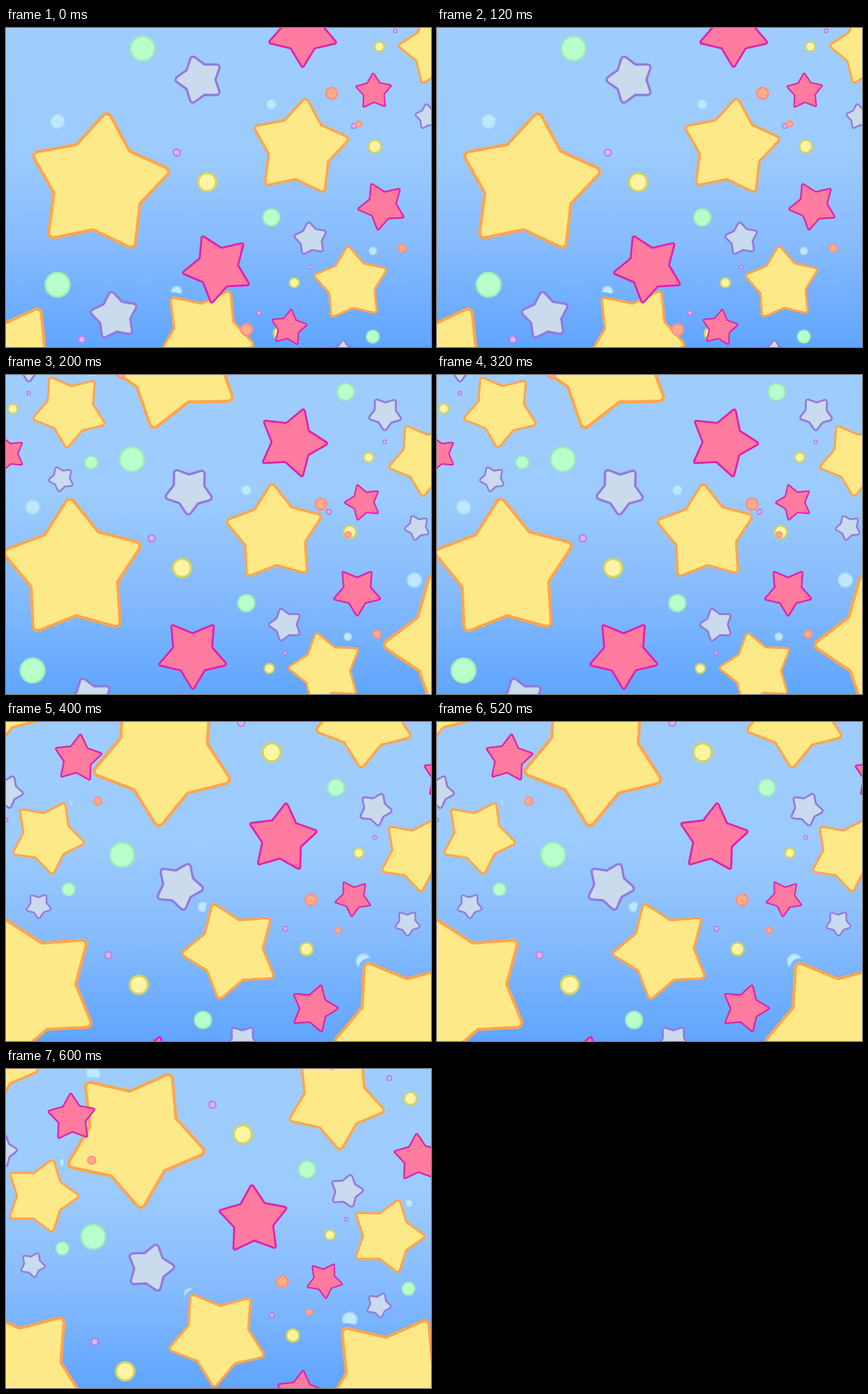
An HTML page with a canvas that plays this animation: 560x420 px, repeating every 800 ms.

```html
<!DOCTYPE html>
<html lang="en">
<head>
<meta charset="utf-8">
<title>Falling stars</title>
<style>
html, body { margin: 0; width: 100%; height: 100%; overflow: hidden; background: #9ecdfd; }
canvas { display: block; }
</style>
</head>
<body>
<canvas id="stage" width="560" height="420"></canvas>
<script>
const ctx = document.getElementById('stage').getContext('2d');
const STEP = 200, STEPS = 4;

const sky = ctx.createLinearGradient(0, 0, 0, 420);
[[0, '#9ecdfd'], [.38, '#9ccbfd'], [.68, '#86bbfd'], [1, '#60a5fe']]
  .forEach(([at, color]) => sky.addColorStop(at, color));

// The same cluster appears at three depths; the far one is mirrored.
const layers = [
  { x: 122, y: 206, size: 1, flip: 1 },
  { x: 387, y: 158, size: .692, flip: 1 },
  { x: 455, y: 337, size: .525, flip: -1 }
];

// Parts of a cluster, back to front. Stars have an inner radius and a tilt (near, far).
const parts = [
  { x: -54, y: -83, r: 9.5, fill: '#bfe8fc', line: '#a5d5f7', w: 2 },
  { x: 0, y: 0, r: 98, inner: 60, round: 6, tilt: [7, -5], halo: true, fill: '#fee988', line: '#ffa54f', w: 4 },
  { x: 143, y: -3, r: 12, fill: '#fff4a3', line: '#d0d465', w: 3 },
  { x: 21, y: 173, r: 34.5, inner: 21, round: 4, tilt: [-8, 2], fill: '#c9dbed', line: '#9478dd', w: 3 },
  { x: -54, y: 132, r: 16, fill: '#b9ffcb', line: '#9bedb8', w: 2.5 },
  { x: 103, y: -42, r: 4.5, fill: '#dfb4f0', line: '#b184e0', w: 2 },
  { x: 157, y: 110, r: 48, inner: 27, round: 2, tilt: [-26, -64], fill: '#ff7b9f', line: '#e01fae', w: 2.5 },
  { x: 195, y: 191, r: 7.5, fill: '#ffad88', line: '#ff8f8b', w: 2.5 }
];

// Clusters fall along this trail, one point per step; a new one enters every loop.
const trail = [
  [112, -311], [98, -227], [85, -163], [47, -117], [0, 0],
  [-33, 51], [-90, 143], [-108, 195], [-125, 246]
];
// Neighbours that reach in from the left and right, by step.
const sides = [
  [],
  [[-371, -291], [470, 147]],
  [[-401, -186], [403, 192]],
  [[-409, -170], [385, 207]]
];

// Stars spin in proportion to how far they have fallen.
const spin = k => -trail[k][1] / 5;

function copies(step) {
  const list = sides[step].map(at => ({ at, turn: spin(step) }));
  for (let k = step; k < trail.length; k += STEPS) list.push({ at: trail[k], turn: spin(k) });
  return list;
}

function starPath(x, y, part, size, turn) {
  const path = new Path2D();
  const point = i => {
    const a = (turn + 36 * i) * Math.PI / 180;
    const r = (i % 2 ? part.inner : part.r) * size;
    return [x + r * Math.sin(a), y - r * Math.cos(a)];
  };
  path.moveTo(...point(-1));
  for (let i = 0; i < 10; i += 2) {
    path.arcTo(...point(i), ...point(i + 1), part.round * size);
    path.lineTo(...point(i + 1));
  }
  path.closePath();
  return path;
}

function circlePath(x, y, r) {
  const path = new Path2D();
  path.arc(x, y, r, 0, 2 * Math.PI);
  return path;
}

function shapes(part, step) {
  return copies(step).flatMap(({ at, turn }) => layers.map(({ x, y, size, flip }) => {
    const px = x + at[0] + part.x * size * flip;
    const py = y + at[1] + part.y * size;
    const path = part.inner
      ? starPath(px, py, part, size, part.tilt[flip < 0 ? 1 : 0] + turn)
      : circlePath(px, py, part.r * size);
    return { path, size };
  }));
}

function draw(step) {
  ctx.fillStyle = sky;
  ctx.fillRect(0, 0, 560, 420);
  ctx.lineJoin = 'round';
  for (const part of parts) {
    const list = shapes(part, step);
    if (part.halo) {
      // A rim of clear sky cuts into whatever lies behind.
      ctx.strokeStyle = sky;
      ctx.lineWidth = 14;
      for (const { path } of list) ctx.stroke(path);
    }
    ctx.fillStyle = part.fill;
    ctx.strokeStyle = part.line;
    for (const { path, size } of list) {
      ctx.lineWidth = part.w * Math.sqrt(size);
      ctx.fill(path);
      ctx.stroke(path);
    }
  }
}

const start = performance.now();
function tick() {
  draw(Math.floor((performance.now() - start) / STEP) % STEPS);
  requestAnimationFrame(tick);
}
tick();
</script>
</body>
</html>
```
